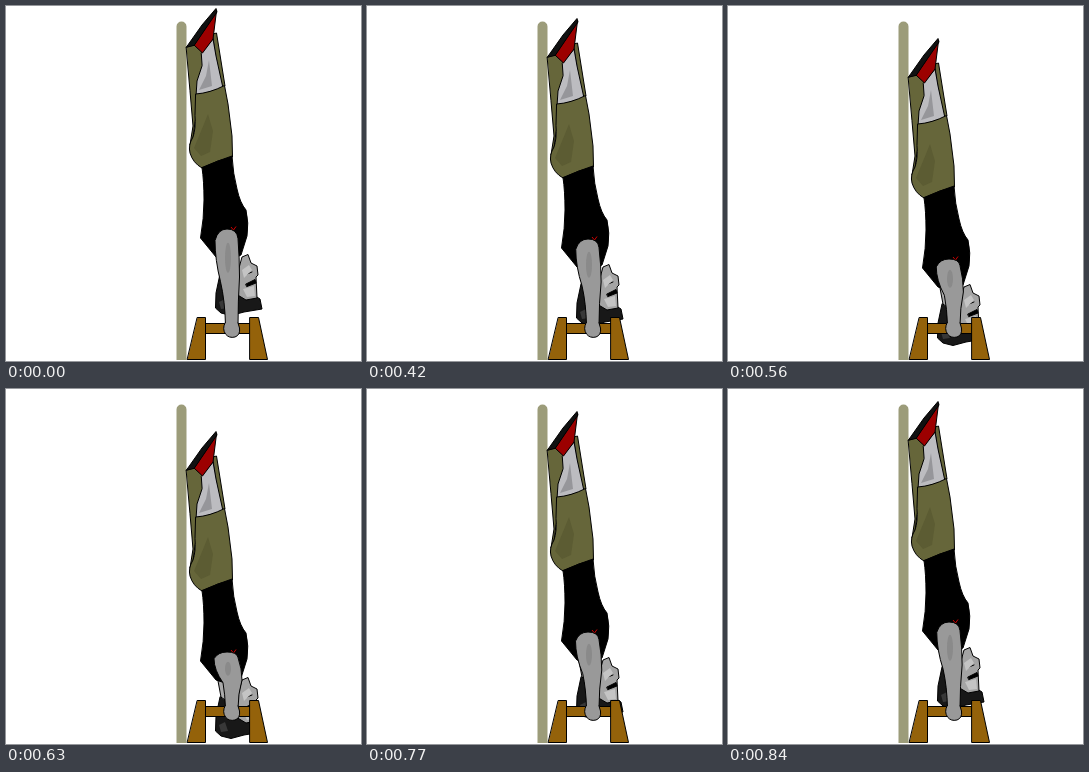
Animation of 355x355 px, one loop 1260 ms. Source, as an HTML page:

```html
<!DOCTYPE html>
<html lang="en">
<head>
<meta charset="utf-8">
<title>Wall handstand push-up</title>
<style>
  html, body { margin: 0; width: 100%; height: 100%; overflow: hidden; background: #fff; }
  svg { display: block; width: 355px; height: 355px; }
  .line { stroke: #000; stroke-width: 1; stroke-linejoin: round; stroke-linecap: round; }
</style>
</head>
<body>
<svg viewBox="0 0 355 355">
  <path fill="#9c9c7a" d="M170.500 354V20.500a5 5 0 0 1 10 0V354Z"/>

  <g id="body">
    <!-- head -->
    <g class="line">
      <path fill="#aaa" d="M212 252L218 284H232V250Z"/>
      <path fill="#181818" d="M214 268L210 287L209.500 302L215 307L225 309.500L238 306L256 303L254 293L240 284Z"/>
      <path fill="#a4a4a4" d="M233 262L236 251L242 248.500L245 257L251 260L252 269L250 271L251 292L240 294L230 288Z"/>
      <path d="M240 278L249 273.500L250 277L241 280.500ZM241 268L246 266"/>
    </g>
    <path fill="#c4c4c4" d="M236 264L243 259L246 264L238 272ZM237 283L248 280L249 290L241 291Z"/>
    <path fill="#383838" d="M213 296L219 293L222 302L215 303Z"/>

    <!-- legs -->
    <g class="line" fill="#66663a">
      <path d="M207 28L210.500 27L219 80L215 81Z"/>
      <path d="M180.500 41L188 39L198 47L196 88L189 116L187 132L184 139L187 120L184 85Z"/>
      <path fill="#bcbcc0" d="M195.500 47L207 33L210 50L217 82L190 90L191 75L196 60Z"/>
      <path d="M190 88Q204 87 218.500 79.500L222 98L226 130L226.500 151L212 155L196 162Q187 157 184 147Q182 139 187 131Q190 122 189 110Z"/>
    </g>
    <path fill="#96969a" d="M203 54L206 80L193 84L200 70Z"/>
    <path fill="#5c5c33" d="M202 108L207 125L204 146L195 150L188 142L193 130Z"/>

    <!-- shoe -->
    <g class="line">
      <path fill="#9c0000" d="M210.500 5L207 33L196.500 47L188 39L201 20Z"/>
      <path fill="#111" d="M180.500 41L196 19L210 2.500L211 6L200 22L188.500 39Z"/>
    </g>

    <!-- torso -->
    <path class="line" d="M196 161.500L212 155L226 150Q227 168 231 183Q234 197 240 204Q243 217 241 230L235 249L222 255L210 251L194.500 232Q198 212 198 194Q198 175 196 161.500Z"/>
    <path fill="none" stroke="#c00" d="M225 221L227.500 224L230 220.500"/>
  </g>

  <!-- stand -->
  <g class="line" fill="#94620a">
    <path d="M198 317.500H245V327.500H198Z"/>
    <path d="M191.500 311.500H199.500V353.500H181.500ZM244 311.500H252.500L261.500 353.500H244Z"/>
  </g>

  <!-- arm -->
  <path id="arm" class="line" fill="#999"/>
  <ellipse id="shade" cx="222" fill="#8a8a8a"/>
  <path class="line" fill="#999" d="M219 317Q216 323 219.500 328Q223 332.500 229 331Q234.500 329 233.500 322L232 317"/>
</svg>
<script>
  const PERIOD = 1260, STEP = 70, HOLD = 420, RISE = 10, COUNT = 4;
  const SHOULDER = 223, WRIST = 319;
  const [body, arm, shade] = ['body', 'arm', 'shade'].map(id => document.getElementById(id));
  const start = performance.now();

  // Down in equal hops, up again, then a rest one hop below the top.
  function dropAt(t) {
    const step = Math.min(Math.floor((t - HOLD) / STEP), 2 * (COUNT - 1));
    return RISE * Math.max(0, COUNT - Math.abs(step - COUNT + 1));
  }

  // The wrist stays put, so the arm shortens and bulges at the elbow.
  function drawArm(drop) {
    const bend = drop / (RISE * COUNT);
    const top = SHOULDER + drop;
    const y = part => top + (WRIST - top) * part;
    const left = 209 - bend, inner = 214.5 + 2.5 * bend, outer = 233.5 + 2.5 * bend;
    arm.setAttribute('d', `M219.5 ${WRIST}Q219 ${y(0.75)} ${inner} ${y(0.55)}
      Q${left} ${y(0.32)} ${left} ${y(0.12)}Q212 ${top} 221 ${top}
      Q231 ${top} 232 ${y(0.1)}Q${outer} ${y(0.3)} ${outer} ${y(0.5)}
      Q232 ${y(0.75)} 232 ${WRIST}`);
    shade.setAttribute('cy', y(0.3));
    shade.setAttribute('rx', 3);
    shade.setAttribute('ry', 15 - 8 * bend);
  }

  function draw() {
    const drop = dropAt((performance.now() - start) % PERIOD);
    body.setAttribute('transform', `translate(0 ${drop})`);
    drawArm(drop);
    requestAnimationFrame(draw);
  }
  draw();
</script>
</body>
</html>
```
